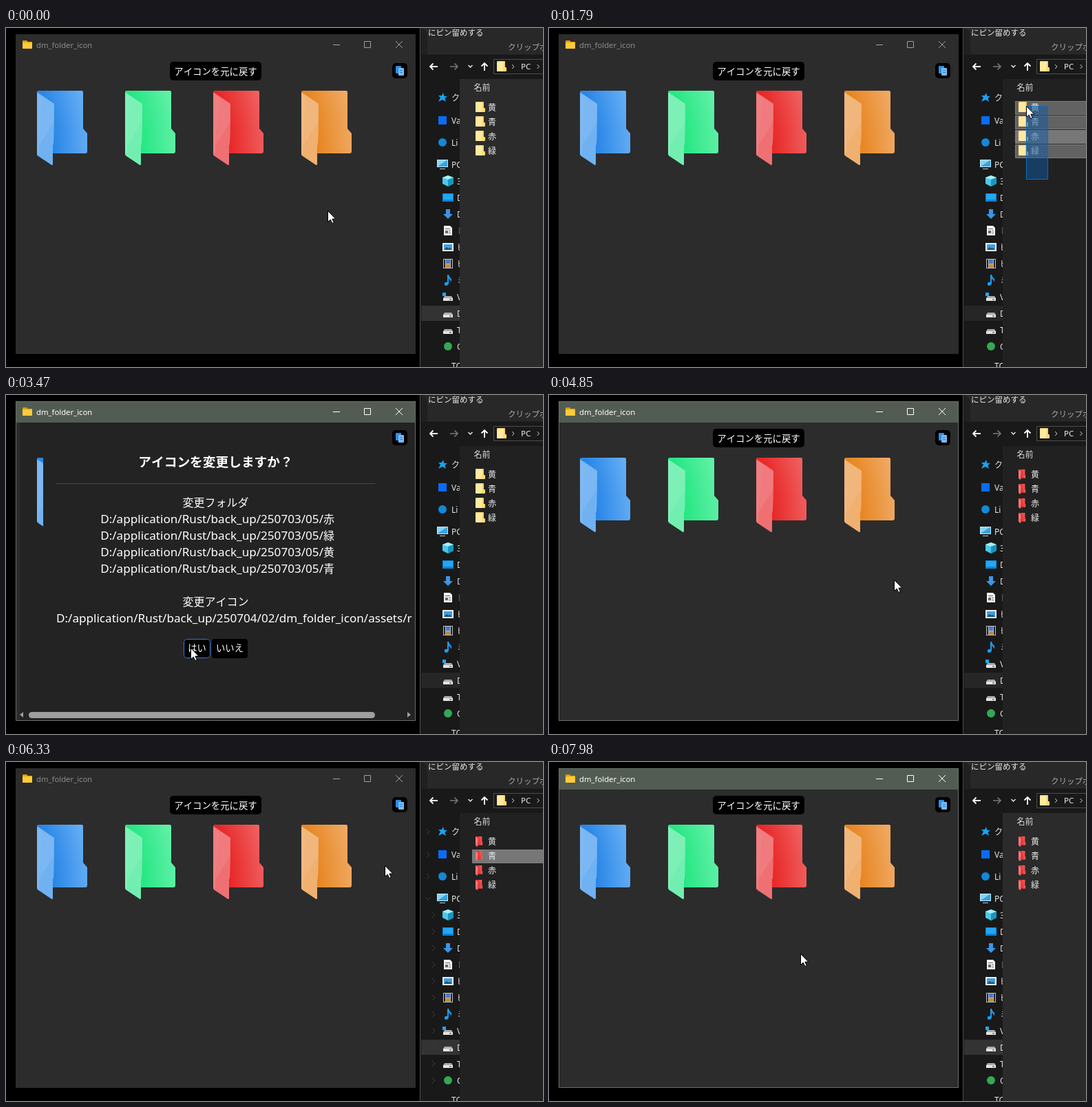
Recreate the animation shown at these times as an HTML page with a canvas. Size 780x492 px, loop 8 s.

```html
<!DOCTYPE html>
<html lang="ja">
<head>
<meta charset="utf-8">
<style>
html, body { margin: 0; width: 100%; height: 100%; overflow: hidden; background: #000; }
canvas { display: block; }
</style>
</head>
<body>
<canvas width="780" height="492"></canvas>
<script>
const ctx = document.querySelector('canvas').getContext('2d');
const LOOP = 8000, TICK = 137.5;
const UI = '"Noto Sans", "Noto Sans CJK JP", sans-serif';
const CJK = '"Noto Sans CJK JP", "Noto Sans CJK", sans-serif';

// [tick, x, y]
const CURSOR = [
  [0, 467, 265], [8, 725, 220], [9, 725, 220], [13, 693, 113], [14, 690, 119], [16, 336, 150],
  [18, 336, 150], [24, 260, 369], [25, 268, 367], [28, 268, 367], [30, 274, 367], [35, 501, 268],
  [38, 515, 262], [42, 708, 134], [43, 708, 134], [46, 550, 150], [50, 98, 143], [51, 98, 143],
  [54, 272, 295], [55, 272, 295], [58, 365, 278]
];
const FOLDERS = [
  { x: 45, dark: '#2886e6', light: '#66aef5', flap: '#70b1f2' },
  { x: 173, dark: '#25e783', light: '#62f0a8', flap: '#72efb0' },
  { x: 301, dark: '#e72727', light: '#f06060', flap: '#ef7073' },
  { x: 429, dark: '#e78622', light: '#f0aa64', flap: '#efb070' }
];
const NAMES = ['黄', '青', '赤', '緑'];
const DRIVE = [['#aaa', 'M-5-1H5L7 2H-7Z'], ['#e4e4e4', 'M-7 2H7V6H-7Z'], ['#333', 'M2 3.5H5V4.5H2Z']];
// [y, label, layers of colour and path around the icon centre]
const NAV = [
  [101, 'ク', [['#1da1f2', 'M1-7L2.5-2L7-2L3.5 1L5 6L0 3L-6 6L-3 0L-6-3L-1-3Z']]],
  [134, 'Va', [['#0a6cf5', 'M-6-6H6V6H-6Z']]],
  [166, 'Li', [['#1488d8', 'M-6 0A6 6 0 1 1 6 0A6 6 0 1 1-6 0']]],
  [198, 'PC', [['#c5e7f7', 'M-8-7H8V4H-8Z'], ['#35a5dd', 'M-7-6H7V3H-7Z'], ['#8bd3f4', 'M-7-6H6L-7 3Z'], ['#ccc', 'M-4 6H4V7H-4Z']]],
  [222, '3', [['#4cc9e8', 'M0-8L8-5V4L0 8L-8 4V-5Z'], ['#a8ecf8', 'M0-8L8-5L0-2L-8-5Z'], ['#1597bd', 'M0-2L8-5V4L0 8Z']]],
  [246, 'D', [['#0c83d9', 'M-8-6H8V6H-8Z'], ['#22a7f5', 'M-7-5H7V3H-7Z']]],
  [270, 'D', [['#3b95e8', 'M-3-7H3V0H7L0 7L-7 0H-3Z']]],
  [294, 'ド', [['#f2f2f2', 'M-6-7H3L6-4V7H-6Z'], ['#667', 'M-4-3H3V-2H-4ZM-4 0H0V4H-4ZM1 0H4V1H1ZM1 3H4V4H1Z']]],
  [318, 'ピ', [['#eee', 'M-8-6H8V6H-8Z'], ['#3aa0e8', 'M-6-4H6V4H-6Z'], ['#24506c', 'M-6 4L-2 0L1 2L3 1L6 4Z']]],
  [342, 'ビ', [['#bbb', 'M-7-7H7V7H-7Z'], ['#222', 'M-6-6H-4V6H-6ZM4-6H6V6H4Z'], ['#3f7fd0', 'M-3-6H3V0H-3Z'], ['#c08a40', 'M-3 1H3V6H-3Z']]],
  [366, 'ミ', [['#1e9bf0', 'M-1-8H1Q2-4 5-2Q6 0 4 3Q4-1 1-2V5Q0 8-3 8Q-6 7-5 4Q-3 2-1 3Z']]],
  [390, 'V', [...DRIVE, ['#22a7f2', 'M-8-6H-3V-1H-8Z']]],
  [414, 'D', DRIVE],
  [438, 'T', DRIVE],
  [462, 'O', [['#34a853', 'M-6 0A6 6 0 1 1 6 0A6 6 0 1 1-6 0']]]
];

function rect(x, y, w, h, fill, radius = 0) {
  ctx.fillStyle = fill;
  ctx.beginPath();
  ctx.roundRect(x, y, w, h, radius);
  ctx.fill();
}
function frame(x, y, w, h, stroke, radius = 0) {
  ctx.strokeStyle = stroke;
  ctx.lineWidth = 1;
  ctx.beginPath();
  ctx.roundRect(x + .5, y + .5, w - 1, h - 1, radius);
  ctx.stroke();
}
function shape(d, fill) {
  ctx.fillStyle = fill;
  ctx.fill(new Path2D(d));
}
function line(d, stroke, width = 1) {
  ctx.strokeStyle = stroke;
  ctx.lineWidth = width;
  ctx.stroke(new Path2D(d));
}
function text(s, x, y, size, fill = '#fff', align = 'left', family = CJK, weight = 400) {
  ctx.font = `${weight} ${size}px ${family}`;
  ctx.textAlign = align;
  ctx.fillStyle = fill;
  ctx.fillText(s, x, y);
}
function at(x, y, draw) {
  ctx.save();
  ctx.translate(x, y);
  draw();
  ctx.restore();
}
function clipped(x, y, w, h, draw) {
  ctx.save();
  ctx.beginPath();
  ctx.rect(x, y, w, h);
  ctx.clip();
  draw();
  ctx.restore();
}

function folder(f, x, y, scale = 1) {
  at(x, y, () => {
    ctx.scale(scale, scale);
    const shade = ctx.createRadialGradient(-214, 91, 238, -214, 91, 292);
    shade.addColorStop(0, f.dark);
    shade.addColorStop(1, f.light);
    shape('M2 0H65Q67 0 67 2V55L73 62V88Q73 91 70 91H20L0 60V2Q0 0 2 0Z', shade);
    shape('M0 2L25 19Q25 60 24 77L23 80V107Q22 109 20 107L2 95Q0 94 0 92Z', f.flap);
    shape('M0 4L10 9L2 94L0 92Z', '#ffffff18');
    shape('M10 9L25 19L24 46L4 78Z', '#ffffff14');
  });
}
function yellowFolder(x, y) {
  rect(x, y, 12, 15, '#f3cf6a', 1);
  rect(x, y + 1, 10, 14, '#ffe9a0', 1);
  rect(x + 9, y + 9, 5, 6, '#ffdb72', 1);
}
function copyButton() {
  rect(561, 51, 22, 22, '#000', 5);
  rect(566, 55, 8, 11, '#2f8de4', 1);
  rect(570, 58, 8, 11, '#7abcf7', 1);
  line('M572 61.5H576M572 64.5H576', '#2f7fd0');
}

function dialog(folders, letter) {
  const end = (folders.length - 4) * 24;
  rect(20, 40, 574, 432, '#232323');
  clipped(45, 91, 9, 110, () => folder(FOLDERS[0], 45, 91));
  copyButton();
  clipped(20, 40, 574, 432, () => {
    text('アイコンを変更しますか？', 304.5, 104, 18.72, '#fff', 'center', CJK, 700);
    ctx.setLineDash([1, 1]);
    line('M73 128.5H536', '#6a6a6a');
    ctx.setLineDash([]);
    text('変更フォルダ', 304.5, 162, 16, '#fff', 'center');
    folders.forEach((name, i) => {
      const y = 186 + i * 24;
      text('D:/application/Rust/back_up/250703/05/', 461, y, 17.1, '#fff', 'right', UI);
      text(name, 461, y, 16);
    });
    text('変更アイコン', 304.5, 306 + end, 16, '#fff', 'center');
    text('D:/application/Rust/back_up/250704/02/dm_folder_icon/assets/' + letter, 73, 330 + end, 17.1, '#fff', 'left', UI);
  });
  rect(258, 354 + end, 39, 28, '#000', 4);
  frame(258, 354 + end, 39, 28, '#3b78e0', 4);
  rect(299, 354 + end, 52, 28, '#000', 4);
  text('はい', 277.5, 372 + end, 13.33, '#fff', 'center');
  text('いいえ', 325, 372 + end, 13.33, '#fff', 'center');
  rect(33, 460, 503, 9, '#9f9f9f', 4.5);
  shape('M25 460V468L20 464ZM583 460V468L588 464Z', '#9f9f9f');
}

function app(k, x, y) {
  const active = k >= 17 && k < 39 || k >= 50;
  const ink = active ? '#fff' : '#8c8c8c';
  rect(14, 9, 581, 464, '#2c2c2c');
  if (active) {
    rect(14, 9, 581, 31, '#535c52');
    frame(14, 9, 581, 464, '#667066');
  }
  rect(24, 18, 7, 5, '#d8920c', 1);
  rect(24, 20, 14, 10, '#f9b61c', 1);
  rect(24, 22, 14, 8, '#ffcb3d', 1);
  text('dm_folder_icon', 44, 29, 11.3, ink, 'left', UI);
  line('M475 24.5H485M520.5 19.5H529.5V28.5H520.5ZM566 19L576 29M576 19L566 29', active ? '#fff' : '#a0a0a0');

  if (k >= 18 && k < 27) return dialog(['赤', '緑', '黄', '青'], 'r');
  if (k >= 52 && k < 56) return dialog(['青'], 'b');

  rect(238, 49, 133, 27, '#000', 5);
  text('アイコンを元に戻す', 304.5, 67.5, 13.4, '#fff', 'center');
  copyButton();
  for (const f of FOLDERS) {
    const hover = x >= f.x && x < f.x + 73 && y > 91 && y < 200;
    ctx.filter = hover ? 'brightness(1.12)' : 'none';
    folder(f, f.x, 91);
  }
  ctx.filter = 'none';
}

function sidebar(k) {
  rect(603, 403, 56, 22, k < 7 || k >= 39 ? '#333' : '#262626');
  NAV.forEach(([y, label, layers], i) => {
    const child = i > 3;
    at(child ? 642 : 634, y, () => layers.forEach(([fill, d]) => shape(d, fill)));
    text(label, child ? 655 : 647, y + 4.5, 12, '#e4e4e4', 'left', UI);
    if (k >= 40 && k < 49) at(child ? 621 : 613, y, () =>
      line(label === 'PC' ? 'M-4-2L0 2L4-2' : 'M-2-4L2 0L-2 4', '#3c3c3c'));
  });
  text('TC', 647, 495, 12, '#e4e4e4', 'left', UI);
}

function explorer(k, y) {
  rect(602, 0, 178, 492, '#191919');
  rect(601, 0, 1, 492, '#505050');
  rect(603, 0, 177, 39, '#202020');
  shape('M605 0Q612 4 612 12V38H780V0Z', '#282828');
  text('にピン留めする', 613, 10.5, 11.5, '#eee');
  text('クリップボード', 729, 31.5, 11.5, '#aaa');
  line('M627 56H616M620.5 51.5L616 56L620.5 60.5M695 62V51M690.5 55.5L695 51L699.5 55.5', '#fff', 1.8);
  line('M645 56H656M651.5 51.5L656 56L651.5 60.5', '#777', 1.6);
  line('M671.5 54L674.5 57L677.5 54', '#eee', 1.4);
  frame(708, 45, 90, 22, '#4c4c4c');
  yellowFolder(713, 48);
  line('M735 53L738 56L735 59M771.5 53L774.5 56L771.5 59', '#ccc');
  text('PC', 748, 60, 11.5, '#eee', 'left', UI);

  rect(659, 74, 121, 418, k < 1 || k >= 50 ? '#2b2b2b' : '#212121');
  text('名前', 679.5, 91, 12, '#ddd');
  NAMES.forEach((name, i) => {
    const top = 105 + i * 21;
    const swept = k >= 9 && k < 17 && y < top + 21 || k >= 14 && k < 17;
    const picked = i === 1 && k >= 42 && k < 50;
    if (swept || picked) {
      rect(677, top + 1, 110, 20, picked || i === 2 ? '#777' : '#626262');
      frame(677, top + 1, 110, 20, '#7c7c7c');
    }
    if (k < 33) yellowFolder(682, top + 2);
    else folder(FOLDERS[2], 682, top + 3, .14);
    text(name, 700, top + 14.5, 12, '#f0f0f0');
  });
  clipped(603, 74, 56, 418, () => sidebar(k));
}

function marquee(x, y) {
  rect(x, y, 725 - x, 220 - y, 'rgba(14, 90, 165, .5)');
  frame(x, y, 725 - x, 220 - y, '#0c6cc4');
}

function pointer(x, y) {
  at(x + .5, y + .5, () => {
    const d = 'M0 0V16L3.7 12.6L6.3 18L8.8 17L6.4 11.6H11.3Z';
    shape(d, '#fff');
    line(d, '#000');
  });
}

function cursorAt(k) {
  const i = Math.max(1, CURSOR.findIndex(p => p[0] >= k));
  const [k0, x0, y0] = CURSOR[i - 1], [k1, x1, y1] = CURSOR[i];
  const u = (k - k0) / (k1 - k0), e = u * u * (3 - 2 * u);
  return [Math.round(x0 + (x1 - x0) * e), Math.round(y0 + (y1 - y0) * e)];
}

function draw(now) {
  const k = Math.floor(now % LOOP / TICK);
  const [x, y] = cursorAt(k);
  rect(0, 0, 780, 492, '#000');
  app(k, x, y);
  explorer(k, y);
  if (k > 9 && k <= 13) marquee(x, y);
  pointer(x, y);
  requestAnimationFrame(draw);
}
requestAnimationFrame(draw);
</script>
</body>
</html>
```
